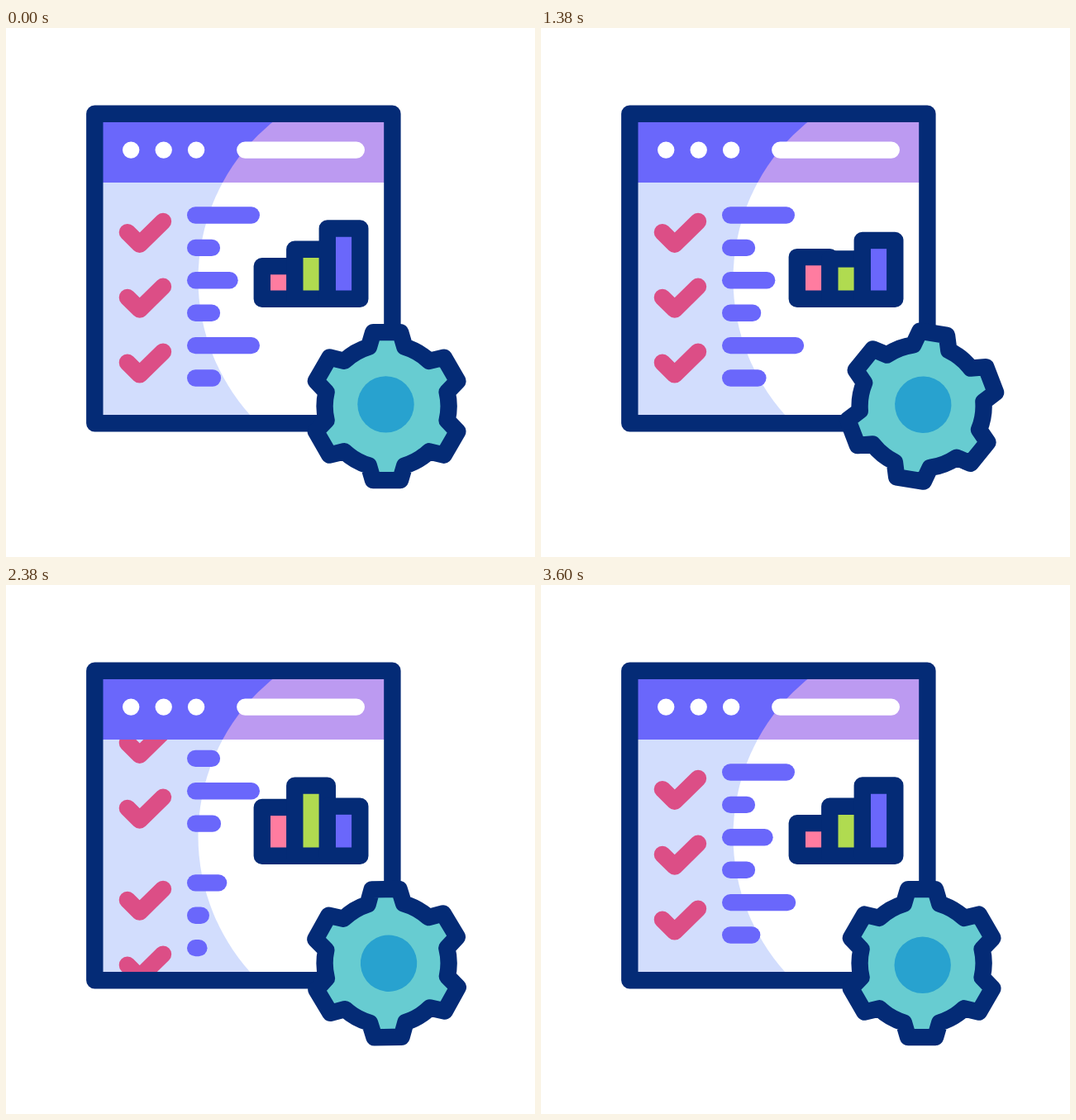
Write an HTML page that moves like this. It is 640 px wide and 640 px high and loops after 3.62 s.

```html
<!DOCTYPE html>
<html lang="en">
<head>
<meta charset="utf-8">
<title>Task dashboard</title>
<style>
  html, body { margin: 0; height: 100%; overflow: hidden; background: #fff; }
  svg { display: block; width: 100%; height: 100%; }
  .round { fill: none; stroke-width: 20.4; stroke-linecap: round; stroke-linejoin: round; }
  .navy { stroke: #042b76; }
  .line { stroke: #6a67fb; }
  .check { stroke: #dc4e86; }
</style>
</head>
<body>
<svg viewBox="0 0 640 640">
  <defs>
    <clipPath id="head"><path d="M107 104H467V187H107Z"/></clipPath>
    <clipPath id="body"><path d="M107 187H467V478H107Z"/></clipPath>
  </defs>
  <g clip-path="url(#body)">
    <path fill="#d2ddfd" d="M107 187H467V478H107Z"/>
    <circle cx="478.5" cy="304" r="246" fill="#fff"/>
    <g id="oldList"></g>
    <g id="newList"></g>
  </g>
  <g clip-path="url(#head)">
    <path fill="#6a67fb" d="M107 104H467V187H107Z"/>
    <circle cx="478.5" cy="304" r="246" fill="#bc9af1"/>
  </g>
  <path class="round" stroke="#fff" d="M151.2 147.6h.01M190.7 147.6h.01M230.1 147.6h.01M289.3 147.6H423.8"/>
  <path class="round navy" d="M107.3 103.8H467.4V478.2H107.3Z"/>
  <g id="chart"></g>
  <g id="gear">
    <path id="cog" class="round navy" style="fill:#67ccd1"/>
    <circle cx="-1.1" cy="-2.2" r="34.2" fill="#28a2cf"/>
  </g>
</svg>
<script>
const LOOP = 3620, SECOND_SCROLL = 1980, SECOND_CHART = 2000;
const ROW = 39.4, LIST_STEP = 268.7, LINE_X = 229.2;
const lineEnds = [296.8, 248.9, 270.5, 248.9, 296.8, 249.9];
const LOW = 298.3, MID = 278, HIGH = 252.7;
const bars = [
  { color: '#ff7ca0', tops: [LOW, MID + 1, HIGH, MID + 1, LOW] },
  { color: '#b0db50', tops: [MID, HIGH, MID, LOW, MID] },
  { color: '#6a67fb', tops: [HIGH, MID, LOW, MID, HIGH] }
];

const byId = id => document.getElementById(id);
const clamp = x => Math.min(1, Math.max(0, x));
const ease = x => (x = clamp(x), x * x * (3 - 2 * x));
const mix = (a, b, k) => a + (b - a) * k;

function add(parent, attrs) {
  const path = document.createElementNS('http://www.w3.org/2000/svg', 'path');
  for (const name in attrs) path.setAttribute(name, attrs[name]);
  return parent.appendChild(path);
}

const linePath = (row, end) => `M${LINE_X} ${226.5 + row * ROW}H${end}`;

function buildList(group) {
  for (let i = 0; i < 3; i++)
    add(group, { class: 'round check', d: `M146.9 ${247.1 + i * 2 * ROW}l14.8 14.7L190 ${234 + i * 2 * ROW}` });
  return lineEnds.map((end, row) => add(group, { class: 'round line', d: linePath(row, end) }));
}

// Each line grows past its length, then settles; rows follow 100 ms apart.
function lineEnd(row, time) {
  const u = time - row * 100, end = lineEnds[row], start = LINE_X + 1;
  return u < 900
    ? mix(start, end + 12.5, ease((u - 80) / 820))
    : mix(end + 12.5, end, ease((u - 900) / 400));
}

function barTop(tops, time) {
  const step = Math.min(3, Math.floor(time / 400));
  return mix(tops[step], tops[step + 1], ease(time / 400 - step));
}

function cogPath() {
  let d = '';
  for (let i = 0; i < 6; i++) {
    const a = i * Math.PI / 3, c = Math.cos(a), s = Math.sin(a);
    const at = (x, y) => `${(x * c - y * s).toFixed(2)} ${(x * s + y * c).toFixed(2)}`;
    d += `${i ? 'A75 75 0 0 1 ' : 'M'}${at(-21.7, -71.8)}L${at(-16.5, -89.5)}L${at(16.5, -89.5)}L${at(21.7, -71.8)}`;
  }
  return d + 'A75 75 0 0 1 -21.7 -71.8Z';
}

byId('cog').setAttribute('d', cogPath());
buildList(byId('oldList'));
const growing = buildList(byId('newList'));
const frames = bars.map(() => add(byId('chart'), { class: 'round navy' }));
const fills = bars.map(bar => add(byId('chart'), { fill: bar.color }));

function draw(t) {
  const listTime = t < SECOND_SCROLL ? t : t - SECOND_SCROLL;
  const chartTime = t < SECOND_CHART ? Math.min(t, 1600) : Math.min(t - SECOND_CHART, 1600);
  const shift = LIST_STEP * ease(listTime / 800);

  byId('oldList').setAttribute('transform', `translate(0 ${-shift})`);
  byId('newList').setAttribute('transform', `translate(0 ${LIST_STEP - shift})`);
  growing.forEach((line, row) => line.setAttribute('d', linePath(row, lineEnd(row, listTime))));

  bars.forEach((bar, i) => {
    const x = 309.8 + i * 39.5, top = barTop(bar.tops, chartTime);
    frames[i].setAttribute('d', `M${x} ${top - 10.2}h39.5V327.7h-39.5Z`);
    frames[i].style.fill = '#042b76';
    fills[i].setAttribute('d', `M${x + 10.2} ${top}h19.1V317.5h-19.1Z`);
  });

  byId('gear').setAttribute('transform', `translate(460.6 457.6) rotate(${Math.min(t, 3600) / 20})`);
}

const begin = performance.now();
function tick() {
  draw((performance.now() - begin) % LOOP);
  requestAnimationFrame(tick);
}
draw(0);
requestAnimationFrame(tick);
</script>
</body>
</html>
```
